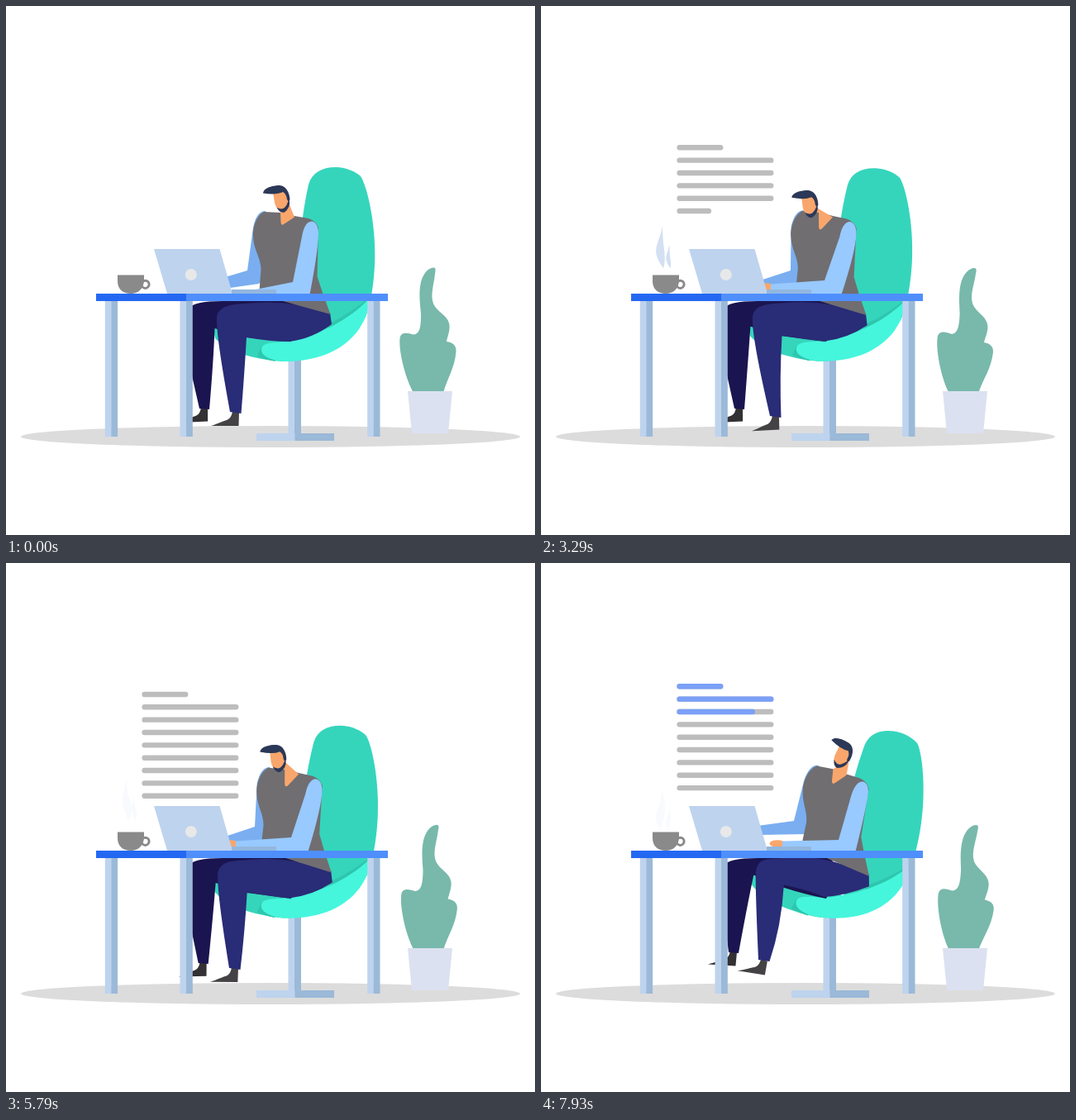
An HTML page with a canvas for the animation above (8000 ms loop, 640 by 640 pixels).

```html
<!DOCTYPE html>
<html lang="en">
<head>
<meta charset="utf-8">
<title>Working at the desk</title>
<style>
  html, body { margin: 0; width: 100%; height: 100%; overflow: hidden; background: #fff; }
  canvas { display: block; width: 100vw; height: 100vh; }
</style>
</head>
<body>
<canvas id="stage"></canvas>
<script>
const LOOP = 8;
const canvas = document.getElementById('stage');
const ctx = canvas.getContext('2d');
const dpr = window.devicePixelRatio || 1;
canvas.width = canvas.height = 640 * dpr;

const clamp = v => Math.max(0, Math.min(1, v));
const smooth = v => { v = clamp(v); return v * v * (3 - 2 * v); };

// Monotone cubic interpolation through values at the shared key times.
const TIMES = [0, 1.29, 3.29, 4.5, 5.79, 6.79, 7.93];
function track(...v) {
  const n = v.length;
  const d = v.slice(1).map((x, i) => (x - v[i]) / (TIMES[i + 1] - TIMES[i]));
  const m = v.map((_, i) => i === 0 || i === n - 1 || d[i - 1] * d[i] <= 0
    ? 0 : 2 * d[i - 1] * d[i] / (d[i - 1] + d[i]));
  return t => {
    if (t >= TIMES[n - 1]) return v[n - 1];
    let i = 0;
    while (t >= TIMES[i + 1]) i++;
    const h = TIMES[i + 1] - TIMES[i], u = (t - TIMES[i]) / h;
    const s = u * u * (3 - 2 * u);
    return v[i] + (v[i + 1] - v[i]) * s
      + h * m[i] * u * (1 - u) * (1 - u) - h * m[i + 1] * u * u * (1 - u);
  };
}

const head = {
  x: track(0, -8, -12.6, -10.5, -10, 3.5, 7.7),
  y: track(0, 3.5, 6.5, 5, 3.5, -0.5, -0.4),
  turn: track(0, 0.06, 0.04, 0.05, 0.05, 0.64, 0.63),
  collar: track(0, 5, 6, 6, 6, 3, 3)
};
const frontArm = {
  elbowX: track(347, 347, 343, 347, 345, 357, 360),
  elbowY: track(334, 333, 332, 334, 332, 333, 335),
  wristX: track(280, 279, 279, 280, 279, 291, 293),
  wristY: track(347, 338, 336, 347, 336, 332, 336)
};
const backArm = {
  elbowX: track(292, 300, 302, 292, 301, 316, 306),
  elbowY: track(320, 320, 320, 320, 319, 314, 312),
  handTop: track(328, 332, 332, 328, 331, 326, 317),
  handLow: track(341, 341, 341, 341, 341, 335, 328)
};
const foot = {
  x: track(271, 271, 277, 276, 270, 262, 263),
  y: track(491, 491, 496, 496, 490, 478, 480),
  turn: track(0, 0, -0.05, -0.05, 0.01, 0.16, 0.15)
};

function fill(color, d) {
  ctx.fillStyle = color;
  ctx.fill(new Path2D(d));
}
function box(color, x, y, w, h) {
  ctx.fillStyle = color;
  ctx.fillRect(x, y, w, h);
}
function oval(color, x, y, rx, ry) {
  ctx.fillStyle = color;
  ctx.beginPath();
  ctx.ellipse(x, y, rx, ry, 0, 0, Math.PI * 2);
  ctx.fill();
}
function turned(x, y, angle, draw) {
  ctx.save();
  ctx.translate(x, y);
  ctx.rotate(angle);
  draw();
  ctx.restore();
}

const PIVOT = { x: 349, y: 410 };
let lean = 0;

// A point of the upright pose, moved by the current lean.
function at(x, y) {
  const c = Math.cos(lean), s = Math.sin(lean);
  const dx = x - PIVOT.x, dy = y - PIVOT.y;
  return [PIVOT.x + dx * c - dy * s, PIVOT.y + dx * s + dy * c];
}
function leaned(draw) {
  turned(PIVOT.x, PIVOT.y, lean, () => {
    ctx.translate(-PIVOT.x, -PIVOT.y);
    draw();
  });
}

const LIGHT = '#bed3ee', SHADE = '#9bb9d8';

function plant(wave) {
  turned(512, 470, 0.038 * (wave + 0.957), () => {
    ctx.translate(-512, -470);
    fill('#78b9ab', `M493 468 C482 448 475 416 476.5 402 C478 393 487 396 493 397.5
      C502 397 502 384 502 372 C501 360 499 347 502 334 C505 323 511 317 517 316.5
      C520 316.5 520 319 519 324 C518 336 513 349 517 360 C522 371 535 374 536.5 386
      C537 394 534 400 533 406 C541 407 545 411 544.5 418 C543 438 534 450 529 468 Z`);
  });
  fill('#dbe1f0', 'M486 466 H540 L535 517 H491 Z');
}

function chair() {
  box(LIGHT, 303, 517, 47, 9);
  box(SHADE, 349, 517, 48, 9);
  box(LIGHT, 341.5, 420, 8, 106);
  box(SHADE, 349, 420, 8, 97);
  leaned(() => {
    fill('#35d5bc', `M357 275 C359 250 363 230 366 216 C370 202 382 195 399 195
      C412 195 424 201 429 206 C437 218 447 262 446.3 303 C446 334 441 362 435 376
      C420 408 380 430 335 430 C300 428 268 418 253 402 L250 388 L365 400 Z`);
    fill('#2ec6ae', 'M390 385 Q420 370 442 350 L435 376 L390 402 Z');
    fill('#2ec6ae', 'M309 412 L326 430 Q312 427 304 424 Z');
    fill('#45f6dc', `M309 416 C309 407 322 407 340 406 C375 400 416 380 439 354
      C440 367 434 380 427 391 C410 415 380 430 337 430 C322 429 309 424 309 416 Z`);
  });
}

const SHOE = 'M3 -1 L11 0 L10.5 17 H-23 C-14 14 -8 11 -3 9.5 Q2 7 3 -1 Z';

function legs(t, lift) {
  const k = lean / 0.14;
  const bx = 234 - 7 * lift, by = 487 - 16 * lift;
  turned(bx - 1, by - 1, -0.04 + 0.1 * lift, () => fill('#333133', SHOE));
  fill('#1a1550', `M350 357 H262 Q226 357 222 366 L221 ${430 - 8 * k}
    L${bx} ${by} L${bx + 12} ${by + 1} Q${251 - 2 * k} ${430 - 14 * k} ${252.5 + 5 * k} ${390 - 13 * k}
    L${291 + 2 * k} ${401 - 9 * k} Q320 ${403 - 2 * k} 345 406 L360 370 Z`);

  const cx = foot.x(t), cy = foot.y(t);
  const kx = 255 + 5 * k, ky = 380 + 3 * k;
  const ix = 291 + 3 * k, iy = 401 - 12 * k;
  turned(cx, cy, foot.turn(t), () => fill('#444244', SHOE));
  fill('#292c76', `M${at(392, 371)} Q340 ${354 - 4 * k} 290 ${360 - 3 * k}
    C${270 + k} ${361 - 3 * k} ${kx - 1} ${364 - 8 * k} ${kx} ${ky}
    Q${kx} ${ky + 24} ${cx} ${cy} L${cx + 13.5} ${cy + 2}
    Q${ix - 3} ${iy + 50} ${ix} ${iy}
    Q320 ${iy + 5} 342 ${406 - 2 * k} Q370 ${403 - k} ${at(394, 385)} Z`);
}

function backSleeve(t) {
  const ex = backArm.elbowX(t), ey = backArm.elbowY(t);
  const top = backArm.handTop(t), low = backArm.handLow(t);
  fill('#7aaef0', `M${at(314, 248)} Q${at(303, 248)} ${at(299, 268)} L${ex} ${ey}
    L262 ${top + 1} L264 ${low + 1} L${ex + 14} ${ey + 16} L${at(325, 320)} Z`);
}

function torso(t) {
  leaned(() => fill('#706e71', `M312 249 C302 254 298 270 299 280 C300 296 308 304 308.5 318
    L306 352 L335 357 L392.5 373 L383 347 L376.5 327 L378 268 Q375 260 366 257
    L349 254 L332 250 Z`));

  const [fx, fy] = at(333, 235);
  const x = fx + head.x(t), y = fy + head.y(t);
  const v = head.collar(t);
  fill('#f9a66c', `M${x - 2} ${y + 10} L${x + 9} ${y + 3} L${at(349, 255.5)}
    L${at(336, 264 + v)} Q${at(333, 266 + v)} ${at(332.5, 262 + v)} L${at(332, 250)} Z`);
  turned(x, y, head.turn(t), () => {
    fill('#f9a66c', 'M-10 -9 L4 -12 L9 -1 L9 5 Q5 13 1 12.5 Q-6 12 -8 3 Z');
    fill('#2c3857', `M10 1 Q11 9 4 14.5 Q-2 16 -5.5 8.5 Q0 12 4 9 Q7 6 8 2 Z
      M-22 -8.5 C-21 -16 -8 -18 -2 -18 C6 -17.5 10 -9 10.5 -1 L9 2.5 L7 -1
      Q6 -8 2 -10 Q-6 -6 -22 -8.5 Z`);
  });
}

function frontSleeve(t) {
  const ex = frontArm.elbowX(t), ey = frontArm.elbowY(t);
  const wx = frontArm.wristX(t), wy = frontArm.wristY(t);
  oval('#f9a66c', wx - 7, wy + 3.5, 9.5, 4.2);
  fill('#98c9ff', `M${ex} ${ey} L${at(358, 279)} Q${at(361, 261)} ${at(370, 260.5)}
    Q${at(378, 262)} ${at(378, 276)} Q${at(377.5, 297)} ${ex + 20.5} 349
    H${ex - 20} L${wx + 8} ${wy + 10} L${wx - 1} ${wy + 8} V${wy + 0.5} Z`);
}

function desk() {
  fill(LIGHT, 'M179 294 H258.5 L274 348 H195 Z');
  oval('#e8e8e9', 223.8, 325, 7, 7);
  box('#93b7df', 273, 343, 54, 5);
  for (const x of [119.8, 210.5, 437.2]) {
    box(LIGHT, x, 356, 7.7, 165);
    box(SHADE, x + 7.5, 356, 7.8, 165);
  }
  box('#2468f2', 109, 348, 109.5, 9);
  box('#4f8ffc', 218, 348, 244, 9);
}

function wisp(x, y, height, width, bend, phase) {
  const left = [], right = [];
  for (let i = 0; i <= 16; i++) {
    const u = i / 16;
    const mid = x + bend * Math.sin(u * 5 + phase) * (0.3 + u * 0.7);
    const half = width * Math.sin(Math.PI * Math.pow(u, 1.5)) + 0.3;
    left.push([mid - half, y + u * height]);
    right.unshift([mid + half, y + u * height]);
  }
  fill('#cddcf0', 'M' + left.concat(right).join(' L') + ' Z');
}

function cup(t) {
  const age = t < 7.48 ? t : t - 7.48;
  ctx.globalAlpha = 0.88 * Math.min(clamp(age / 2.7), clamp((6.15 - age) / 2.2));
  if (ctx.globalAlpha > 0 && age < 6.15) {
    const y = 275 - 2.2 * age;
    wisp(145.8, y, 49, 4.8, 2.6, 0.6 + age * 0.5);
    wisp(154.8, y + 22, 27, 2.3, 1.6, 0.8 + age * 0.5);
  }
  ctx.globalAlpha = 1;
  ctx.strokeStyle = '#8a8a8a';
  ctx.lineWidth = 3;
  ctx.beginPath();
  ctx.arc(168.5, 336.8, 4.6, 0, Math.PI * 2);
  ctx.stroke();
  fill('#8a8a8a', 'M135 325.5 H167 V333 C166 343 159 348 151 348 C142 348 135 343 135 333 Z');
}

// Rows of writing share one running length.
function rows(color, y, length) {
  ctx.strokeStyle = color;
  ctx.lineWidth = 6.4;
  ctx.lineCap = 'round';
  for (let i = 0; i < 9 && length > 0; i++) {
    const full = i ? 117 : 56;
    const w = Math.max(6.5, Math.min(full, length));
    ctx.beginPath();
    ctx.moveTo(167.6, y + i * 15.35);
    ctx.lineTo(161.2 + w, y + i * 15.35);
    ctx.stroke();
    length -= full;
  }
}

function draw(t) {
  const wave = Math.cos((t - 2.27) / 5 * Math.PI * 2);
  const lift = smooth((t - 5.4) / 1.4);
  lean = 0.0205 * (wave + 0.957) + 0.1 * lift;

  ctx.setTransform(dpr, 0, 0, dpr, 0, 0);
  box('#fff', 0, 0, 640, 640);
  oval('#dcdcdc', 320, 521, 302, 13);
  plant(wave);
  chair();
  legs(t, lift);
  backSleeve(t);
  torso(t);
  frontSleeve(t);
  cup(t);
  desk();

  const y = 189.27 - 5.755 * t + 0.09 * t * t;
  rows('#bdbdbd', y, (t - 0.777) * 225);
  rows('#7ba0f7', y, (t - 6.698) * 217);
}

const start = performance.now();
function tick() {
  draw((performance.now() - start) / 1000 % LOOP);
  requestAnimationFrame(tick);
}
tick();
</script>
</body>
</html>
```
